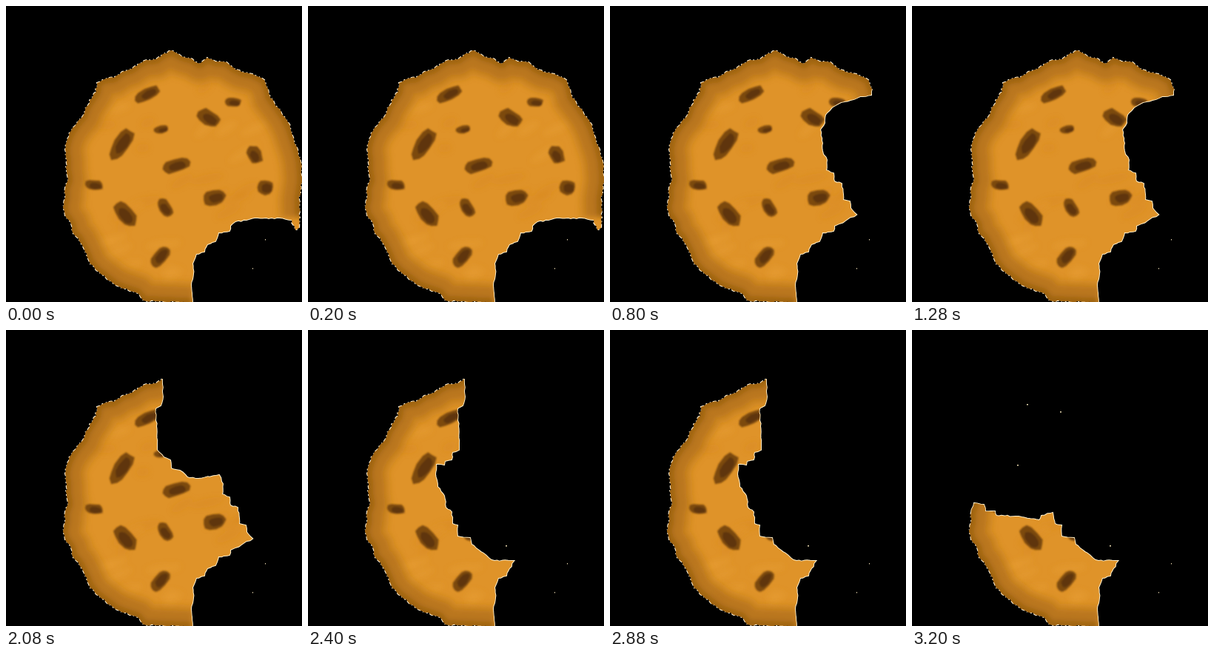
An HTML page that plays this animation: 400x400 px, repeating every 3800 ms.

```html
<!DOCTYPE html>
<html lang="en">
<head>
<meta charset="utf-8">
<title>Cookie</title>
<style>
  html, body { margin: 0; width: 100%; height: 100%; overflow: hidden; background: #000; }
  svg { display: block; width: 100vw; height: 100vh; }
</style>
</head>
<body>
<svg viewBox="0 0 400 400">
  <defs>
    <clipPath id="shape"><path id="clip"/></clipPath>
    <filter id="soft" filterUnits="userSpaceOnUse" x="0" y="0" width="460" height="460"><feGaussianBlur stdDeviation="3.5"/></filter>
    <filter id="smudge" filterUnits="userSpaceOnUse" x="0" y="0" width="460" height="460"><feGaussianBlur stdDeviation="1"/></filter>
  </defs>
  <path id="fringe" fill="none" stroke="#fff4dc" stroke-width="2.2" stroke-dasharray="5 3 2 4 1 3"/>
  <path id="biteEdge" fill="none" stroke="#fff0cc" stroke-width="2"/>
  <g clip-path="url(#shape)">
    <rect width="400" height="400" fill="#df9329"/>
    <g id="mottle" filter="url(#soft)"></g>
    <g id="rim" fill="none" filter="url(#soft)" stroke-linejoin="round"></g>
    <g id="chips" filter="url(#smudge)"></g>
  </g>
  <g id="crumbs" fill="#e9d9b0"></g>
</svg>
<script>
const $ = id => document.getElementById(id);
const points = text => text.split(' ').map(p => p.split(',').map(Number));
const noise = (a, b) => {
  const v = Math.sin(a * 12.9898 + b * 78.233) * 43758.5453;
  return v - Math.floor(v) - 0.5;
};
const add = (parent, tag, attrs) => {
  const el = document.createElementNS('http://www.w3.org/2000/svg', tag);
  for (const key in attrs) el.setAttribute(key, attrs[key]);
  return parent.appendChild(el);
};
const toPath = list => 'M' + list.map(p => p.map(n => n.toFixed(1)).join(' ')).join('L');

// Splits a polyline into short pieces and nudges them for a crumbly edge.
function roughen(list, size) {
  const out = [list[0]];
  for (let i = 1; i < list.length; i++) {
    const [ax, ay] = list[i - 1], [bx, by] = list[i];
    const n = Math.max(1, Math.round(Math.hypot(bx - ax, by - ay) / 4));
    for (let k = 1; k < n; k++) {
      const x = ax + (bx - ax) * k / n, y = ay + (by - ay) * k / n;
      out.push([x + noise(x, y) * size, y + noise(y, x) * size]);
    }
    out.push([bx, by]);
  }
  return out;
}

// Clockwise from the bottom of the cookie.
const crust = points('252,401 186,398 178,388 160,382 148,377 135,367 122,357 113,346 106,329 98,314 90,306 ' +
  '88,294 80,283 77,272 80,259 80,246 84,235 82,222 82,208 80,194 83,180 88,169 96,158 104,149 108,137 ' +
  '116,125 122,116 123,104 133,99 146,97 157,89 170,85 179,78 190,73 203,72 211,66 224,60 237,68 252,72 ' +
  '262,78 272,70 283,75 298,76 308,84 318,89 333,92 349,100 354,112 357,124 368,138 377,151 384,165 ' +
  '389,180 394,194 398,210 400,235 396,262 397,285 396,300 391,303 386,289');

const bottom = '272,322 268,332 257,335 252,348 253,362 250,376 252,401';
const lower = '303,297 302,304 287,306 283,318 ' + bottom;
const right = '293,208 292,222 302,226 303,237 313,240 315,262 324,264 325,273 333,282 318,290 ' + lower;
const top3 = '212,90 209,102 202,106 203,130 204,162 ';
const left = '202,264 202,279 219,281 221,290 230,297 244,308 252,312 278,312 ' + bottom;

const steps = [
  [0, 61, '370,286 355,287 340,286 325,289 310,291 ' + lower],
  [800, 48, '353,120 338,122 325,127 312,130 300,137 291,147 290,158 284,167 286,182 287,196 ' + right],
  [1600, 36, top3 + '213,172 222,176 223,187 235,190 245,199 260,201 288,196 ' + right],
  [2400, 36, top3 + '195,165 194,175 185,177 184,182 173,181 172,195 175,212 184,224 186,240 194,246 195,262 ' + left],
  [3200, 16, '84,234 97,236 99,245 112,245 114,251 140,252 172,257 175,251 190,247 193,262 ' + left]
].map(([at, count, text]) => {
  const outer = crust.slice(0, count);
  const edge = roughen(outer, 2.4);
  const bite = roughen([outer[count - 1], ...points(text)], 1.6);
  return { at, edge: toPath(edge), bite: toPath(bite), whole: toPath(edge.concat(bite)) + 'Z' };
});

const rimPath = toPath(crust.slice(0, 58));
[[58, '#b97519', 0.45], [42, '#a96817', 0.55], [12, '#82500f', 0.5]].forEach(([width, stroke, opacity]) =>
  add($('rim'), 'path', { d: rimPath, stroke, 'stroke-width': width, opacity }));

for (let i = 0; i < 32; i++) {
  const cx = 240 + noise(i, 3) * 240, cy = 235 + noise(i, 8) * 260;
  add($('mottle'), 'ellipse', {
    cx, cy, rx: 16 + noise(i, 5) * 16, ry: 6, opacity: 0.3,
    fill: i % 2 ? '#eaa23a' : '#d8851b', transform: `rotate(${-25 + noise(i, 9) * 40} ${cx} ${cy})`
  });
}

function blob(rx, ry, seed) {
  const list = [];
  for (let i = 0; i < 12; i++) {
    const a = i * Math.PI / 6, r = 1 + noise(i, seed) * 0.22;
    const square = v => Math.sign(v) * Math.abs(v) ** 0.8;
    list.push([square(Math.cos(a)) * rx * r, square(Math.sin(a)) * ry * r]);
  }
  return toPath(list) + 'Z';
}

// x, y, half length, half width, angle
[
  [191, 119, 18, 8, -28], [307, 130, 11, 6, 5], [274, 151, 16, 10, 30], [156, 187, 23, 11, -57],
  [210, 167, 10, 5, -12], [229, 216, 19, 9, -15], [336, 201, 13, 9, 60], [119, 242, 12, 7, 4],
  [161, 281, 19, 11, 50], [215, 272, 13, 8, 55], [282, 259, 15, 10, -12], [350, 245, 11, 10, 0],
  [208, 339, 17, 9, -52]
].forEach(([x, y, rx, ry, angle], i) => {
  const chip = add($('chips'), 'g', { transform: `translate(${x} ${y}) rotate(${angle})` });
  add(chip, 'path', { d: blob(rx, ry, i + 1), fill: '#7b4a10' });
  add(chip, 'path', { d: blob(rx * 0.65, ry * 0.6, i + 20), fill: '#55300a', opacity: 0.75, transform: 'translate(2 1)' });
});

// x, y, time of appearance
const crumbs = [[350, 315, 0], [333, 354, 0], [267, 291, 2400], [155, 100, 3200], [200, 110, 3200], [142, 182, 3200]]
  .map(([x, y, at]) => ({ at, el: add($('crumbs'), 'rect', { x, y, width: at ? 2 : 1, height: 1.5 }) }));

let shown;
function draw(now) {
  const time = now % 3800;
  const step = steps.filter(s => s.at <= time).pop();
  if (step !== shown) {
    shown = step;
    $('clip').setAttribute('d', step.whole);
    $('fringe').setAttribute('d', step.edge);
    $('biteEdge').setAttribute('d', step.bite);
    crumbs.forEach(c => c.el.setAttribute('visibility', c.at <= time ? 'visible' : 'hidden'));
  }
}
const start = performance.now();
function tick() {
  draw(performance.now() - start);
  requestAnimationFrame(tick);
}
tick();
</script>
</body>
</html>
```
